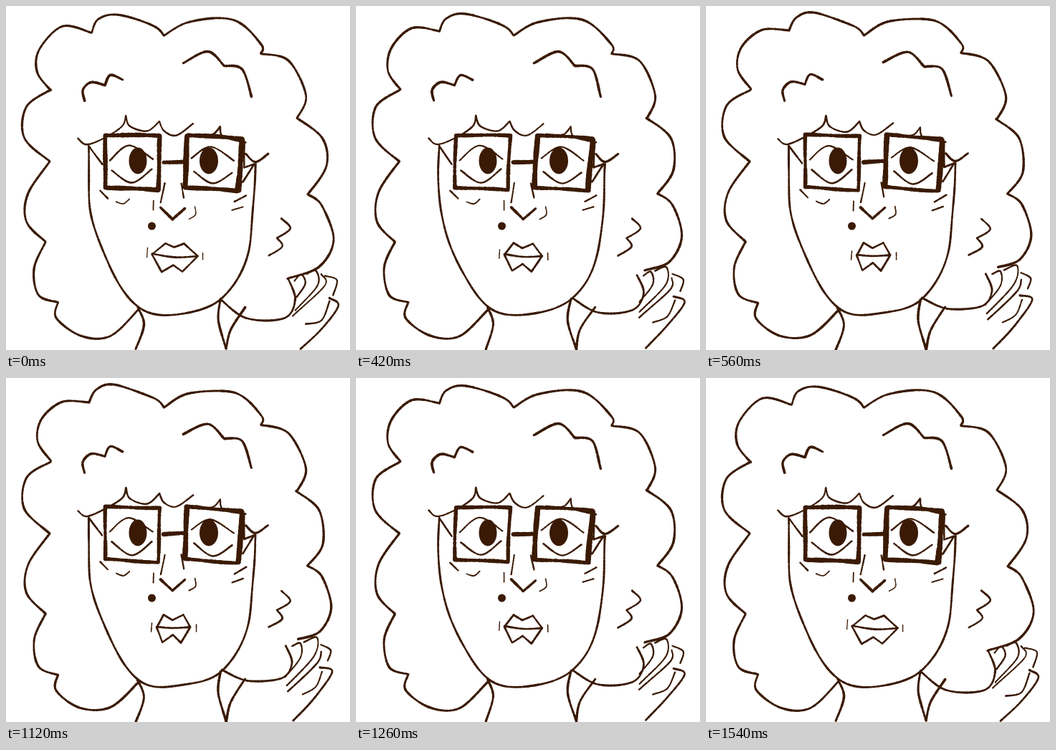
An HTML page with a canvas that plays this animation: 480x480 px, repeating every 1.68 s.

```html
<!DOCTYPE html>
<html lang="en">
<head>
<meta charset="utf-8">
<title>Curly portrait</title>
<style>
html, body { margin: 0; height: 100%; overflow: hidden; background: #fff; }
canvas { display: block; }
</style>
</head>
<body>
<canvas id="stage" width="480" height="480"></canvas>
<script>
const order = 'AABCDEEEDCBA', names = 'ABCDE', beat = 140;

const grain = n => { const s = Math.sin(n * 127.1) * 43758.5453; return s - Math.floor(s); };

function spline(a, b, c, d, t) {
  return .5 * (2 * b + (c - a) * t + (2 * a - 5 * b + 4 * c - d) * t * t + (3 * b - a - 3 * c + d) * t * t * t);
}

const parse = path => path.split('/').map(piece => piece.trim().split(' ').map(p => p.split(',').map(Number)));

// One redrawing of the portrait; pose runs from 0 (lips wide) to 4 (lips pursed).
function sketch(pose) {
  const ink = new Path2D(), lean = pose / 4;

  function dot(x, y, rx, ry = rx) {
    ink.moveTo(x + rx, y);
    ink.ellipse(x, y, rx, ry, 0, 0, 2 * Math.PI);
  }

  // An uneven round nib that boils a little from pose to pose.
  function brush(points, width) {
    const at = i => points[Math.max(0, Math.min(points.length - 1, i))];
    for (let i = 0; i < points.length - 1; i++) {
      const [a, b, c, d] = [at(i - 1), at(i), at(i + 1), at(i + 2)];
      const steps = Math.ceil(Math.hypot(c[0] - b[0], c[1] - b[1]) * 1.2);
      for (let k = 0; k <= steps; k++) {
        const [x, y] = [0, 1].map(n => spline(a[n], b[n], c[n], d[n], k / steps));
        const press = .86 + .1 * Math.sin((x + y) / 9 + pose) + .24 * grain(x + y * 3.7 + pose);
        dot(x + .6 * Math.sin(y / 17 + pose * 2), y + .6 * Math.sin(x / 17 + pose * 3), width / 2 * press);
      }
    }
  }

  // Points are "x,y"; "/" keeps a sharp corner; a second path is the pursed end of the move.
  function line(width, start, end = start) {
    const goal = parse(end);
    let corner = [];
    parse(start).forEach((piece, i) => {
      const moved = piece.map((p, j) => p.map((v, n) => v + (goal[i][j][n] - v) * lean));
      const points = [...corner, ...moved];
      brush(points, width);
      corner = points.slice(-1);
    });
  }

  function hair() {
    line(3.2, '62,118 44,92 47,60 78,29 119,37/128,18 155,12 205,28 220,41', '63,115 45,88 51,56 78,34 114,33/125,16 150,9 205,27 220,41');
    line(3.2, '220,41 255,22 318,20 356,53 356,66/395,77 418,125 406,157');
    line(3.3, '406,157 442,184 447,222 421,263/441,278 457,325 436,364 393,381', '404,157 436,185 440,235 420,261/441,277 453,318 438,350 412,358');
    line(3.2, '62,117 28,140 26,183 61,217/31,260 29,300 55,329');
    line(3.2, '55,329 39,365 46,403 73,414/70,436 103,460 145,460 185,424');
    line(3, '301,411 335,435 388,436 404,410 394,381', '302,405 340,419 384,413 398,393 389,371');
    line(3.6, '109,132 107,117 119,106 138,110/146,96 163,103');
    line(3.5, '248,79 282,64 305,84/330,88 342,126');
    line(2.8, '385,297 397,311 378,324/385,336 366,348');
    line(2.5, '101,185 113,193 137,184 162,168 167,153/173,168 197,175 214,161/221,174 238,180 261,164');
    line(2.6, '265,179 288,180 299,169/304,183 335,190');
    line(3.2, '335,206 348,217 366,206');
  }

  function face() {
    line(3, '116,195 118,285 148,370 190,424 245,429 302,408 338,342 348,220');
    line(3.4, '184,421 192,445 181,479');
    line(3.4, '300,409 296,440 307,479/313,452 334,420');
    line(2.4, '221,247 216,274');
    line(2.4, '244,247 248,267');
    line(3.8, '216,281 233,297/250,282');
    line(2, '206,272 206,285');
    line(1.8, '264,280 265,291 256,297');
    line(2.4, '131,257 142,268');
    line(2, '154,273 164,276 172,270');
    line(2.6, '319,273 335,264');
    line(2.2, '316,285 331,280');
    dot(203.5, 307, 5.5);
  }

  function eyes() {
    line(2.4, '145,215 172,195 205,214');
    line(2.6, '147,229 175,247 203,228');
    line(2.4, '259,212 286,197 318,216');
    line(2.6, '262,231 288,248 315,233');
    dot(184, 216, 12.5, 18.5);
    dot(283, 216, 13, 18.5);
  }

  function glasses() {
    const heft = pose ? 1 : 1.2;
    line(5 * heft, '139,180/215,181/212,257/138,253/139,180');
    line(5 * heft, '254,180/330,185/322,258/250,253/254,180');
    line(7, '253,181/249,252');
    line(7, '330,187/324,257');
    line(5.5, '220,218/246,217');
    line(2.6, '116,195 134,220');
    line(2.8, '333,190 332,225/346,220/330,245');
  }

  function mouth() {
    line(2.8, '203,347/222,331/234,336/248,331/267,349/246,370/233,361/217,371/203,347', '212,348/219,330/231,339/247,331/253,348/243,370/232,358/218,368/212,348');
    line(2.8, '203,346 235,350 267,349', '212,347 231,349 253,348');
    line(1.6, '197,338 196,351', '205,343 204,354');
    line(1.6, '274,345 274,354', '262,344 262,354');
  }

  function hand() {
    line(2.4, '403,384 412,375 418,388 406,407', '398,370 410,368 409,390 385,420');
    line(2.4, '420,374 432,369 435,390 404,425', '414,366 434,360 428,388 388,430');
    line(2.4, '440,374 445,390 400,433', '440,385 430,402 391,438');
    line(2.4, '445,376 462,382 457,403', '437,371 450,380 447,392');
    line(3, '452,407 464,418 440,450 411,479', '434,403 453,408 430,441 397,477');
    line(2.4, '418,444 440,438 452,411', '412,440 430,428 438,410');
  }

  for (const part of [hair, face, eyes, glasses, mouth, hand]) part();
  return ink;
}

const inks = [...names].map((_, pose) => sketch(pose));
const ctx = document.getElementById('stage').getContext('2d');

function tick() {
  const slot = Math.floor(performance.now() / beat) % order.length;
  ctx.fillStyle = '#fff';
  ctx.fillRect(0, 0, 480, 480);
  ctx.fillStyle = '#3a1a04';
  ctx.fill(inks[names.indexOf(order[slot])]);
  requestAnimationFrame(tick);
}
tick();
</script>
</body>
</html>
```
